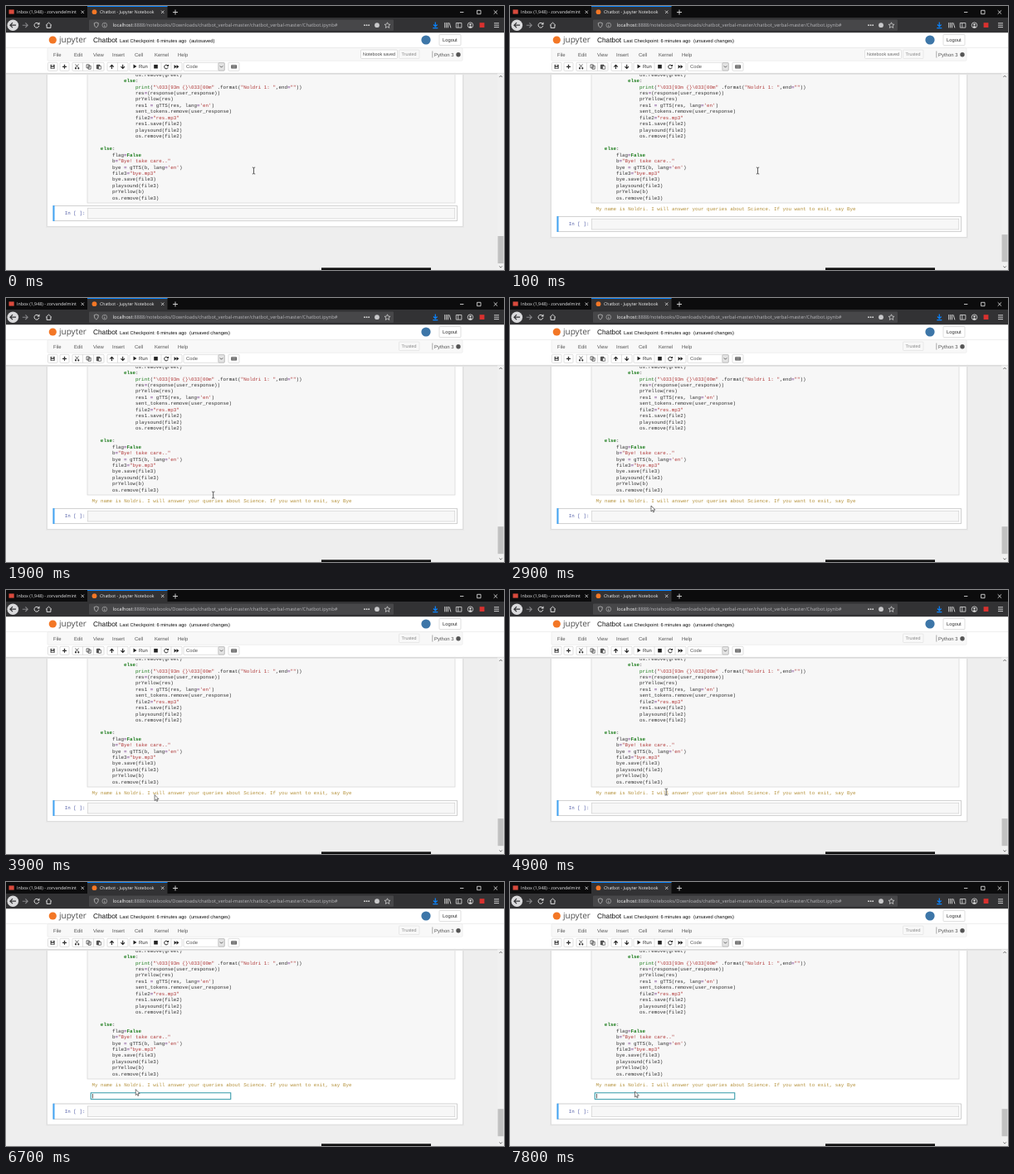
Write an HTML page that moves like this. It is 600x319 px and loops after 8 s.

```html
<!DOCTYPE html>
<html lang="en">
<head>
<meta charset="utf-8">
<title>Notebook</title>
<style>
html, body { margin: 0; width: 100%; height: 100%; overflow: hidden; background: #eee; }
svg { display: block; width: 600px; height: 319px; }
text { white-space: pre; text-rendering: geometricPrecision; font-family: "Liberation Sans", Arial, sans-serif; }
.ui { font-family: "Open Sans", "Noto Sans", sans-serif; }
.code { font: 5.86px "Liberation Mono", "DejaVu Sans Mono", monospace; }
.k { fill: #1c7c1c; font-weight: bold; }
.b { fill: #1c7c1c; }
.s { fill: #b03a3a; }
.o { fill: #8a5a9c; font-weight: bold; }
</style>
</head>
<body>
<svg id="stage" viewBox="0 0 600 319"></svg>
<script>
const stage = document.getElementById('stage');
const add = markup => stage.insertAdjacentHTML('beforeend', markup);
const rect = (x, y, w, h, fill, extra = '') =>
  `<rect x="${x}" y="${y}" width="${w}" height="${h}" fill="${fill}" ${extra}/>`;
const box = (x, y, w, h, fill = '#fff', line = '#ccc') =>
  rect(x, y, w, h, fill, `stroke="${line}" stroke-width=".6" rx="1"`);
const dot = (x, y, r, fill) => `<circle cx="${x}" cy="${y}" r="${r}" fill="${fill}"/>`;
const text = (x, y, size, fill, str, extra = '') =>
  `<text x="${x}" y="${y}" font-size="${size}" fill="${fill}" ${extra}>${str}</text>`;
const ui = (...args) => text(...args, 'class="ui"');
const code = (x, y, fill, str) => `<text class="code" x="${x}" y="${y}" fill="${fill}">${str}</text>`;
const line = (d, color, width = 1, fill = 'none') =>
  `<path d="${d}" stroke="${color}" stroke-width="${width}" fill="${fill}"/>`;
const shape = (d, fill) => `<path d="${d}" fill="${fill}"/>`;

// Notebook page
add(rect(0, 32, 600, 287, '#eee'));
add(`<g id="paper">${rect(48, -100, 504, 368, '#e8e8e8')}${rect(49, -100, 502, 367, '#dedede')}${rect(50, -100, 500, 366, '#fff')}</g>`);
add(rect(98, 60, 443, 178, '#f7f7f7', 'stroke="#d4d4d4" stroke-width=".7"'));

const source = [
  [4, 'os.remove(greet)'],
  [3, 'else:'],
  [4, 'print("\\033[93m {}\\033[00m" .format("Noldri 1: ",end=""))'],
  [4, 'res=(response(user_response))'],
  [4, 'prYellow(res)'],
  [4, "res1 = gTTS(res, lang='en')"],
  [4, 'sent_tokens.remove(user_response)'],
  [4, 'file2="res.mp3"'],
  [4, 'res1.save(file2)'],
  [4, 'playsound(file2)'],
  [4, 'os.remove(file2)'],
  [0, ''],
  [1, 'else:'],
  [2, 'flag=False'],
  [2, 'b="Bye! take care.."'],
  [2, "bye = gTTS(b, lang='en')"],
  [2, 'file3="bye.mp3"'],
  [2, 'bye.save(file3)'],
  [2, 'playsound(file3)'],
  [2, 'prYellow(b)'],
  [2, 'os.remove(file3)']
];
const kinds = { else: 'k', False: 'k', print: 'b', '=': 'o' };
const highlight = str => str.replace(/"[^"]*"|'[^']*'|\b(?:else|False|print)\b|=/g,
  token => `<tspan class="${kinds[token] || 's'}">${token}</tspan>`);
source.forEach(([depth, str], i) =>
  add(code(99.8 + depth * 14.07, 84.6 + i * 7.46, '#333', highlight(str))));

add(`<g id="output">${code(103.5, 246.6, '#b5923c',
  'My name is Noldri. I will answer your queries about Science. If you want to exit, say Bye')}</g>`);
add(`<g id="prompt">${rect(101.4, 253.9, 170.2, 9.4, '#c9e6ea', 'rx="1"')}
  ${rect(102.3, 254.8, 168.4, 7.6, '#fff', 'stroke="#2f96a5" stroke-width=".9"')}
  <path id="caret" d="M104.5 256v5.4" stroke="#222" stroke-width=".7"/></g>`);
add(`<g id="cell">${rect(57, 241.3, 486.6, 18.4, '#fff', 'stroke="#bbb" stroke-width=".7"')}
  ${rect(56.5, 241, 2, 19, '#42a5f5')}${code(70.8, 252.4, '#5560a8', 'In [ ]:')}
  ${rect(98.4, 244.2, 442.4, 12.8, '#f7f7f7', 'stroke="#cfcfcf" stroke-width=".7"')}</g>`);

// Page header
add(rect(0, 81, 600, 2, '#e4e4e4') + rect(0, 80.6, 600, 1.2, '#d8d8d8') + rect(0, 32, 600, 48.8, '#fff'));
add(dot(56.3, 41, 4.6, '#f37726') + ui(64, 44.4, 10, '#4e4e4e', 'jupyter'));
add(text(105, 44, 8.3, '#111', 'Chatbot') + text(137, 43.6, 5.75, '#111', 'Last Checkpoint: 6 minutes ago'));
add(text(221, 43.6, 5.75, '#111', '', 'id="status"'));
add(dot(506, 41, 5.6, '#3d76a8') + box(522, 34.5, 26, 13) + text(526, 43.2, 5.8, '#333', 'Logout'));
add(rect(0, 49.9, 600, .7, '#e7e7e7') + box(50, 50.5, 500, 15.7, '#f8f8f8', '#e7e7e7'));
[[57, 'File'], [82, 'Edit'], [105, 'View'], [128, 'Insert'], [155, 'Cell'], [179, 'Kernel'], [207, 'Help'], [516, 'Python 3']]
  .forEach(([x, str]) => add(text(x, 60.8, 5.95, '#555', str)));
add(`<g id="toast">${box(427.5, 53, 44, 10.5)}${text(430, 60.4, 5.4, '#444', 'Notebook saved')}</g>`);
add(box(473.5, 53, 24.5, 10.5, '#f8f8f8', '#ddd') + text(476.5, 60.4, 5.4, '#888', 'Trusted'));
add(dot(545, 58.8, 2.7, '#555') + line('M513.8 54.5v8', '#777', .6));

// Toolbar
[[50.5, 11.5], [65, 11], [80, 38], [122, 25], [149, 63], [214, 49.5], [268, 13]]
  .forEach(([x, w]) => add(box(x, 68.3, w, 10)));
[92.5, 105.5, 134.5, 174, 187, 199].forEach(x => add(line(`M${x} 68.3v10`, '#ccc', .6)));
add(rect(53.6, 70.8, 5, 5, '#333') + rect(54.8, 70.8, 2.4, 1.6, '#fff') + rect(54.6, 73.7, 3, 1.5, '#fff'));
add(line('M70.5 70.8v5M68 73.3h5', '#333', 1.3));
add(line('M83.5 70.5l4 4M87.5 70.5l-4 4', '#333', .8) + dot(84, 75.3, 1.1, '#333') + dot(87.3, 75.3, 1.1, '#333'));
add(line('M97 70.8h3.2v4H97zM99 72.2h3.2v4H99z', '#333', .7, '#fff'));
add(line('M109.4 71.2h3.6v4.6h-3.6z', '#333', .8, '#555') + line('M111.6 72.6h3v3.6h-3z', '#333', .6, '#fff'));
add(line('M127.5 76v-4.6M125.2 73.6l2.3-2.3 2.3 2.3', '#222', 1.1));
add(line('M140.7 70.8v4.6M138.4 73.2l2.3 2.3 2.3-2.3', '#222', 1.1));
add(shape('M153.5 70.6v5l4-2.5z', '#222') + text(160, 75.2, 5.9, '#333', 'Run'));
add(rect(178.2, 70.9, 4.6, 4.6, '#222'));
add(line('M194.9 72.2a2.3 2.3 0 1 0 .3 2', '#222', 1) + shape('M196 70.5v2.6h-2.6z', '#222'));
add(shape('M202.6 70.9v4.8l2.9-2.4zM205.5 70.9v4.8l2.9-2.4z', '#222'));
add(text(217, 75.4, 5.8, '#555', 'Code') + box(255.8, 68.6, 7.4, 9.4, '#e4e4e4', '#aaa') + line('M257.8 72.4l1.7 1.8 1.7-1.8', '#444', .8));
add(rect(271.3, 71.2, 6.6, 4.3, '#444', 'rx=".5"') + line('M272.2 72.4h4.8M272.2 74.2h4.8', '#fff', .6));

// Scrollbar and strip at the bottom edge
add(rect(592, 81.6, 8, 237.4, '#f0f0f0') + `<g id="thumb">${rect(592.5, 278, 7, 33, '#c1c1c1')}</g>`);
add(line('M594.4 314.4l1.7 1.8 1.7-1.8', '#555', .8) + line('M594.4 86l1.7-1.8 1.7 1.8', '#555', .8));
add(rect(380, 316.3, 132, 2.7, '#111'));

// Browser chrome
add(rect(0, 0, 600, 14.5, '#0c0c0d') + rect(0, 14, 600, 18.2, '#323234'));
add(rect(98, 0, 96.5, 14.5, '#323234') + rect(98, 0, 96.5, 1, '#0a84ff'));
add(rect(3.5, 4.4, 6.2, 5.2, '#d94a3d') + ui(13, 9.2, 5.3, '#e8e8ea', 'Inbox (1,948) - zorvandelmint'));
add(rect(89.3, 1, 8.7, 13, '#0c0c0d') + dot(106.5, 7.2, 2.9, '#f37726') + ui(113, 9.2, 5.15, '#f5f5f5', 'Chatbot - Jupyter Notebook'));
add(line('M90.6 5.6l3.4 3.4m0-3.4l-3.4 3.4M187 5.6l3.4 3.4m0-3.4l-3.4 3.4', '#ddd', .8));
add(line('M204 4.5v6M201 7.5h6', '#ddd', .9));
add(line('M547 7.5h4.4M567.6 5.3h4.4v4.4h-4.4zM587.7 5.3l4.4 4.4m0-4.4l-4.4 4.4', '#eee', .8));
add(dot(8.3, 23.2, 6.8, '#dadadc') + line('M12 23.2H5M8 20.2l-3 3 3 3', '#323234', 1.2));
add(line('M19.8 23.2h6.4M23.4 20.4l2.8 2.8-2.8 2.8', '#858588', 1.1));
add(line('M39.3 21.5a2.9 2.9 0 1 0 .5 2.4', '#ddd', 1) + shape('M40.5 19.4v3.2h-3.2z', '#ddd'));
add(line('M51.2 23.4l3.5-3.3 3.5 3.3M52.3 23v3.4h4.8V23', '#ddd', 1).replace('<path', '<path transform="translate(-3.2)"'));
add(rect(100, 16.5, 367, 13.3, '#474749', 'rx="1"'));
add(line('M106.2 20.8l2.6-.9 2.6.9q0 4.1-2.6 5.4-2.6-1.3-2.6-5.4z', '#bbb', .8));
add(line('M118.8 22.8v2.4M118.8 21v.8', '#bbb', .8) + `<circle cx="118.8" cy="23.1" r="2.9" fill="none" stroke="#bbb" stroke-width=".6"/>`);
add(ui(128.5, 25.3, 5.77, '#b6b6ba',
  '<tspan fill="#f5f5f5">localhost</tspan>:8888/notebooks/Downloads/chatbot_verbal-master/chatbot_verbal-master/Chatbot.ipynb#'));
[432, 434.6, 437.2].forEach(x => add(dot(x, 23.2, .9, '#ddd')));
add(dot(447, 23.2, 2.9, '#c8c8ca'));
add(line('M459.5 19.8l1 2.3 2.5.2-1.9 1.6.6 2.5-2.2-1.3-2.2 1.3.6-2.5-1.9-1.6 2.5-.2z', '#ddd', .7));
add(line('M517.3 19.6v5M515 22.5l2.3 2.4 2.3-2.4M514.3 26.7h6', '#0a84ff', 1.2));
add(line('M528.7 20v6.4M530.6 20v6.4M532.5 20v6.4M534 20.2l1.9 6.2', '#ddd', .9));
add(line('M542.3 20.5h6.6v5.6h-6.6zM544.8 20.5v5.6', '#ddd', .8));
add(`<circle cx="559.5" cy="23.2" r="3.3" fill="none" stroke="#ddd" stroke-width=".8"/>` + dot(559.5, 22.4, 1.2, '#ddd') + shape('M557.4 25.4q2.1-2.2 4.2 0l-2.1 1z', '#ddd'));
add(rect(570.6, 20.2, 5.8, 5.8, '#d8312f'));
add(line('M588 20.8h6M588 23.2h6M588 25.6h6', '#ddd', .9));

// Mouse pointers
add(`<g id="beam">${line('M-1.7-3.9h1.2l.5.5.5-.5h1.2M0-3.4v6.8M-1.7 3.9h1.2l.5-.5.5.5h1.2', '#333', .8)}</g>`);
add(`<g id="arrow">${line('M0 0v7l1.6-1.5 1 2.4 1.1-.5-1-2.3h2.2z', '#222', .6, '#fff')}</g>`);

const LOOP = 8000, OUTPUT = 100, INPUT = 6700;
const path = [
  [0, 298.5, 199], [1000, 298.5, 199], [1500, 381.5, 251], [1900, 249.7, 238],
  [2200, 249.7, 238], [2500, 288.5, 250], [2900, 170, 251],
  [3700, 170, 251], [4100, 188.2, 244], [6000, 188.2, 244],
  [6600, 157.3, 250.2], [7100, 152, 252], [7500, 150.5, 253], [LOOP, 150.5, 253]
];
const part = Object.fromEntries([...stage.querySelectorAll('[id]')].map(el => [el.id, el]));
const move = (el, x, y) => el.setAttribute('transform', `translate(${x} ${y})`);
const show = (el, visible) => el.setAttribute('opacity', +visible);

function pointer(t) {
  const i = path.findIndex(p => p[0] > t);
  const [t0, x0, y0] = path[i - 1], [t1, x1, y1] = path[i];
  const k = (t - t0) / (t1 - t0);
  return [x0 + (x1 - x0) * k, y0 + (y1 - y0) * k];
}

function draw(now) {
  const t = Math.floor(now % LOOP / 100) * 100;
  const shift = t < OUTPUT ? 0 : t < INPUT ? 13 : 26.7;
  move(part.paper, 0, shift);
  move(part.cell, 0, shift);
  move(part.thumb, 0, -shift * .14);
  show(part.output, t >= OUTPUT);
  show(part.prompt, t >= INPUT);
  show(part.caret, (t - INPUT) % 1000 < 500);
  show(part.toast, Math.max(0, Math.min(1, (500 - t) / 500)));
  part.status.textContent = t < OUTPUT ? '(autosaved)' : '(unsaved changes)';
  const [x, y] = pointer(t);
  const isArrow = y > 247;
  show(part.arrow, isArrow);
  show(part.beam, !isArrow);
  move(isArrow ? part.arrow : part.beam, x, y);
}

const start = performance.now();
function tick() {
  draw(performance.now() - start);
  requestAnimationFrame(tick);
}
tick();
</script>
</body>
</html>
```
